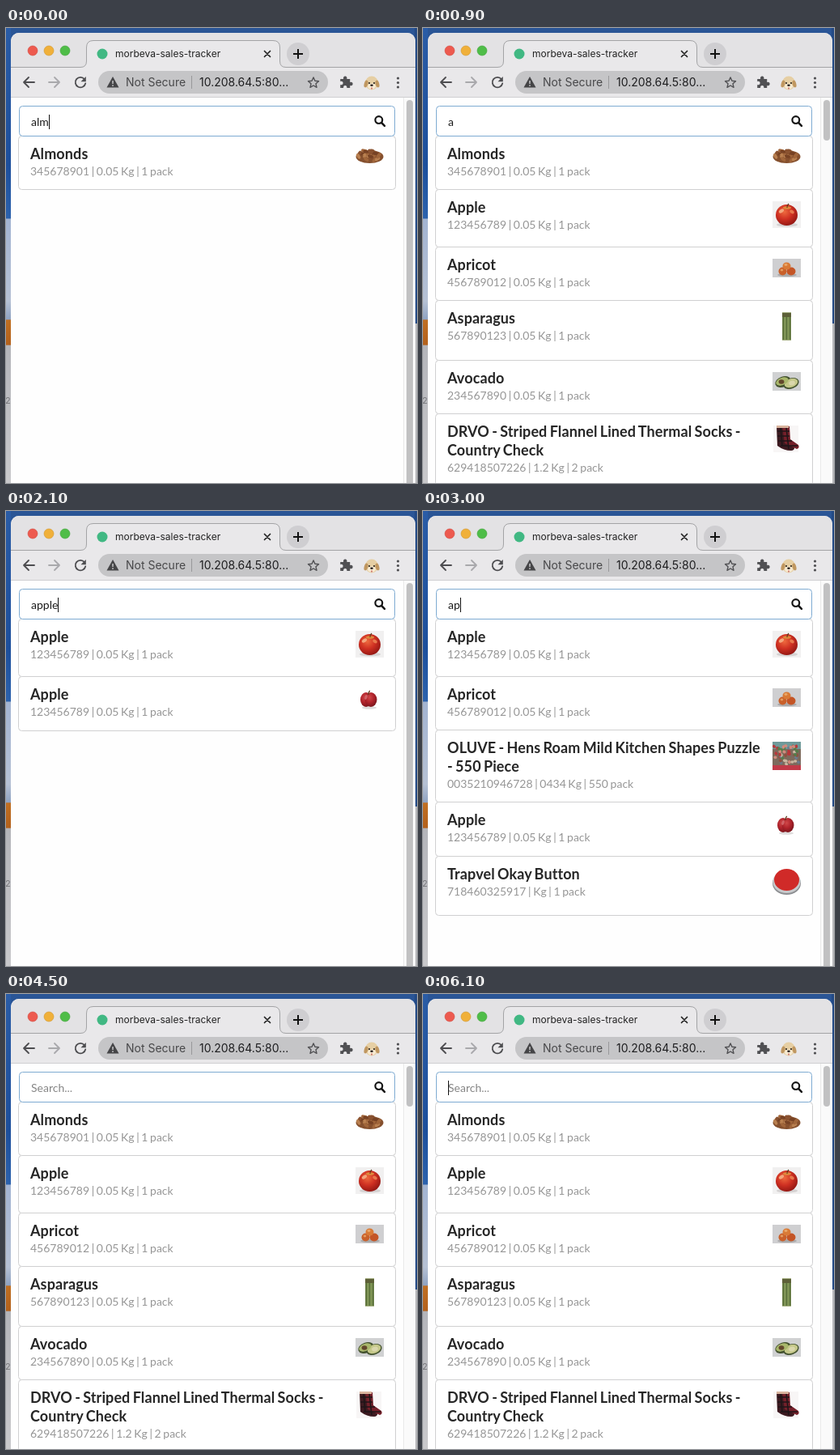
These frames come from a looping animation (508x562 px, 6.2 s). An HTML page:

```html
<!DOCTYPE html>
<html lang="en">
<head>
<meta charset="utf-8">
<title>Product search</title>
<style>
  html, body { margin: 0; width: 100%; height: 100%; overflow: hidden; background: #fff; }
  svg { display: block; }
  text { white-space: pre; }
  .ui { font-family: Inter, Roboto, sans-serif; }
  .lato { font-family: Lato, sans-serif; font-size: 14px; word-spacing: -.07em; }
  .title { font-weight: 700; font-size: 18px; letter-spacing: .006em; fill: #262626; }
  .info { fill: #969696; }
  .line { fill: none; stroke-linecap: round; stroke-linejoin: round; }
</style>
</head>
<body>
<svg width="508" height="562" viewBox="0 0 508 562">
  <defs>
    <linearGradient id="wall" x2="0" y2="1">
      <stop offset="0" stop-color="#2a5ca6"/>
      <stop offset=".3" stop-color="#1d4f9c"/>
      <stop offset=".418" stop-color="#2c62ad"/>
      <stop offset=".42" stop-color="#a3b4d2"/>
      <stop offset=".6" stop-color="#b6c1d4"/>
      <stop offset=".64" stop-color="#8fa3c2"/>
      <stop offset=".642" stop-color="#c06f22"/>
      <stop offset=".696" stop-color="#b3611c"/>
      <stop offset=".698" stop-color="#b4b5ba"/>
      <stop offset="1" stop-color="#c9c9cc"/>
    </linearGradient>
    <radialGradient id="red" cx=".4" cy=".35" r=".7">
      <stop offset="0" stop-color="#ee6a3e"/>
      <stop offset=".5" stop-color="#cf3022"/>
      <stop offset="1" stop-color="#8f1512"/>
    </radialGradient>
    <radialGradient id="darkRed" cx=".4" cy=".35" r=".7">
      <stop offset="0" stop-color="#d0484a"/>
      <stop offset=".5" stop-color="#b0232b"/>
      <stop offset="1" stop-color="#74141b"/>
    </radialGradient>
  </defs>

  <!-- desktop -->
  <rect width="508" height="562" fill="url(#wall)"/>
  <rect x="6" width="502" height="20" fill="#2a5596"/>
  <rect x="505" width="3" height="365" fill="#234a86"/>
  <rect x="505" y="365" width="3" height="197" fill="#b9babd"/>
  <text class="ui" x="-1" y="464" font-size="11" fill="#77787c">2</text>

  <!-- window -->
  <path d="M6 562V16a10 10 0 0 1 10-10H496a10 10 0 0 1 10 10V562Z" fill="#fefefe"/>
  <path d="M6 86V16a10 10 0 0 1 10-10H496a10 10 0 0 1 10 10V86Z" fill="#e3e2e4"/>
  <path d="M6 48.5H92Q99.5 48.5 99.5 41V24Q99.5 15.5 108 15.5H330Q338.5 15.5 338.5 24V41Q338.5 48.5 346 48.5H506V85.5H6Z" fill="#e9e8ea"/>
  <path d="M6 48.5H92Q99.5 48.5 99.5 41V24Q99.5 15.5 108 15.5H330Q338.5 15.5 338.5 24V41Q338.5 48.5 346 48.5H506" fill="none" stroke="#a3a3a5"/>
  <path d="M6 85.5H506" stroke="#cfcfd1"/>
  <g stroke-width=".6">
    <circle cx="33" cy="28" r="6" fill="#ed5a4f" stroke="#d1493f"/>
    <circle cx="53" cy="28" r="6" fill="#f0b03a" stroke="#d1962c"/>
    <circle cx="73" cy="28" r="6" fill="#4fbd48" stroke="#3ea338"/>
  </g>
  <circle cx="119" cy="32" r="6.5" fill="#41b883"/>
  <text class="ui" x="135" y="36.3" font-size="12" fill="#222">morbeva-sales-tracker</text>
  <path class="line" d="M319.5 28.5l7 7m0-7l-7 7" stroke="#222" stroke-width="1.7"/>
  <circle cx="361" cy="32" r="14" fill="#cfced1"/>
  <path d="M355 32h12M361 26v12" stroke="#111" stroke-width="2"/>

  <!-- toolbar -->
  <g class="line" stroke-width="1.8">
    <path d="M35 67H22m6-6l-6 6 6 6" stroke="#4d4d50"/>
    <path d="M53 67h13m-6-6l6 6-6 6" stroke="#a9a9ac"/>
    <path d="M97 63.2A6.3 6.3 0 1 0 98.2 68.5" stroke="#4d4d50"/>
  </g>
  <path d="M98.8 60v6.3h-6.3Z" fill="#4d4d50"/>
  <rect x="114" y="53" width="284" height="28" rx="14" fill="#c5c5c7"/>
  <path d="M132 60l7.5 13.5h-15Z" fill="#454547"/>
  <path d="M132 65v4m0 1.3v1.7" stroke="#c5c5c7" stroke-width="1.5"/>
  <text class="ui" x="148" y="72" font-size="14" fill="#48484a">Not Secure</text>
  <path d="M229.5 59v16" stroke="#98989a"/>
  <text class="ui" x="239" y="72" font-size="14" fill="#1e1e20">10.208.64.5:80...</text>
  <path class="line" d="M380 61l1.900 4.200 4.600.5-3.500 3.100 1 4.500-4-2.300-4 2.300 1-4.500-3.500-3.100 4.600-.5Z" stroke="#505053" stroke-width="1.4"/>
  <path transform="translate(-.8 0)" d="M414 63h4a2.300 2.300 0 1 1 4 0h4v4a2.300 2.300 0 1 1 0 4v3h-4a2.200 2.200 0 1 0-4 0h-4v-4a2.300 2.300 0 1 0 0-4Z" fill="#505053"/>
  <g>
    <ellipse cx="452" cy="68" rx="8" ry="8.500" fill="#e6cfa4"/>
    <ellipse cx="445" cy="69" rx="2.300" ry="4.500" fill="#c09760" transform="rotate(15 445 69)"/>
    <ellipse cx="459" cy="69" rx="2.300" ry="4.500" fill="#c09760" transform="rotate(-15 459 69)"/>
    <ellipse cx="452" cy="72" rx="5" ry="3.600" fill="#f7ead2"/>
    <circle cx="449" cy="68" r="1.100" fill="#2a2320"/>
    <circle cx="455" cy="68" r="1.100" fill="#2a2320"/>
    <ellipse cx="452" cy="70.800" rx="1.800" ry="1.300" fill="#2a2320"/>
    <path d="M451 73.500h2v2h-2Z" fill="#d08078"/>
  </g>
  <g fill="#4d4d50"><circle cx="484.5" cy="62" r="1.600"/><circle cx="484.5" cy="67.500" r="1.600"/><circle cx="484.5" cy="73" r="1.600"/></g>

  <!-- page -->
  <rect x="491" y="86" width="15" height="476" fill="#fafafa"/>
  <path d="M491.5 86V562" stroke="#e9e9e9"/>
  <rect id="thumb" x="495" y="89" width="8" rx="4" fill="#c1c1c2"/>
  <g id="list"></g>
  <rect x="16.5" y="96.5" width="464" height="37" rx="4" fill="#fff" stroke="#7eabd2"/>
  <text id="field" class="lato" x="31" y="121"></text>
  <path id="caret" d="M.5 107V125" stroke="#111"/>
  <circle class="line" cx="460.8" cy="113.600" r="4.400" stroke="#151515" stroke-width="2.200"/>
  <path class="line" d="M464.300 117.200l3.600 3.600" stroke="#151515" stroke-width="2.600"/>
</svg>
<script>
const LOOP = 6200;
const get = id => document.getElementById(id);

function seeded(seed) {
  return () => (seed = (seed * 16807) % 2147483647) / 2147483647;
}
const repeat = (n, fn) => Array.from({ length: n }, (_, i) => fn(i)).join('');
const box = (x, y, w, h, fill) => `<rect x="${x}" y="${y}" width="${w}" height="${h}" fill="${fill}"/>`;
const oval = (x, y, rx, ry, fill, turn = 0) =>
  `<ellipse cx="${x}" cy="${y}" rx="${rx}" ry="${ry}" fill="${fill}" transform="rotate(${turn} ${x} ${y})"/>`;

// Pictures are drawn in a 35px wide space.
function almonds() {
  const rnd = seeded(77), tones = ['#a0653a', '#8a5230', '#b98050', '#774224'];
  return oval(17.5, 11, 17, 8, '#85502e') + repeat(26, i => {
    const a = rnd() * 6.28, r = Math.sqrt(rnd());
    return oval(17.5 + Math.cos(a) * r * 14, 10 + Math.sin(a) * r * 8, 3.6, 2, tones[i % 4], rnd() * 120 - 60);
  });
}
const apple = () => box(0, 0, 35, 33, '#f1f0f0') + oval(18, 29, 13, 2.5, '#d5d2d2') +
  oval(17.5, 17, 13.5, 13, 'url(#red)') + oval(11, 12, 3.5, 2, '#f3a67c', -35) + oval(24, 13, 3, 2, '#e8784c', 30) +
  oval(18, 8, 5, 1.8, '#dc8a3c') + '<path d="M18 8q0-3 2-5" fill="none" stroke="#5c3a1c" stroke-width="1.2"/>';
const smallApple = () => oval(17, 24, 9, 1.8, '#dedcdc') + oval(13, 14, 7, 9, 'url(#darkRed)') +
  oval(19, 14, 7.5, 9, 'url(#darkRed)') + oval(13, 11, 1.6, 3, '#d06468', 20) +
  '<path d="M16 8q0-4 2-5" fill="none" stroke="#5c3a1c" stroke-width="1.2"/>';
const apricots = () => box(0, 0, 35, 23, '#cfcfd1') + oval(18, 20, 12, 2, '#aaa9a9') +
  oval(12.5, 15.5, 5, 5, '#c9602a') + oval(23, 15.5, 5.5, 5, '#c45526') + oval(17.5, 9, 5, 4.5, '#d97a36') +
  oval(11.5, 14, 1.8, 1.4, '#e39a5c') + oval(16.5, 7.5, 2, 1.4, '#eaa868');
const asparagus = () => box(12, 0, 11, 35, '#a3ad80') + repeat(5, i =>
  `<path d="M${13.3 + i * 2.1} ${1 + i % 2}V34" stroke="${i % 2 ? '#76904a' : '#50692f'}" stroke-width="1.7"/>`) +
  box(12, 1, 11, 5, '#5d6038');
const avocado = () => box(0, 0, 35, 23, '#d0d1d2') + oval(13, 12, 10, 6.5, '#43522f', -20) +
  oval(23, 14, 10, 6.5, '#43522f', -20) + oval(23, 13.5, 8.5, 5.2, '#c5c88a', -20) + oval(12, 11.5, 8, 4.6, '#a9b76c', -20) +
  oval(24, 13.5, 4, 2.8, '#dad7ac', -20) + oval(11, 12, 3.4, 2.8, '#63472c');
const socks = () => box(1, 0, 31, 33, '#f8f6f6') +
  '<path d="M5 1H15L16 18 26 25Q29 30 23 31 14 31 6 25Z" fill="#3d1a20"/>' +
  '<path d="M12 1H21L22 17 32 24Q34 28 30 29L15 22Z" fill="#74202a"/>' +
  '<path d="M6 7H21M6 13H21M7 19H24M10 25H31M10 2L12 25M17 2L20 29" stroke="#1f1518" stroke-width="1.6"/>' +
  box(5, 0, 15, 3, '#d9b49e');
function puzzle() {
  const rnd = seeded(31), tones = ['#b8383b', '#547d4a', '#d28a7c', '#6b7b8d', '#8f5140', '#c9b6a0'];
  return box(0, 0, 35, 35, '#7d6a5c') + box(0, 0, 35, 9, '#6f9a9a') +
    repeat(45, i => oval(2 + rnd() * 31, 4 + rnd() * 24, 2.2, 1.8, tones[i % 6], rnd() * 90)) +
    box(0, 29, 35, 6, '#c23a48');
}
const button = () => oval(17.5, 19, 17.5, 14, '#8d8f92') + oval(17.5, 17, 17, 14, '#c8cacc') +
  oval(17.5, 14.5, 15.5, 13.5, '#d02a28');

// title lines, info, row height, picture
const items = [
  [['Almonds'], '345678901 | 0.05 Kg | 1 pack', 66, almonds],
  [['Apple'], '123456789 | 0.05 Kg | 1 pack', 71, apple],
  [['Apricot'], '456789012 | 0.05 Kg | 1 pack', 66, apricots],
  [['Asparagus'], '567890123 | 0.05 Kg | 1 pack', 74, asparagus],
  [['Avocado'], '234567890 | 0.05 Kg | 1 pack', 66, avocado],
  [['DRVO - Striped Flannel Lined Thermal Socks -', 'Country Check'], '629418507226 | 1.2 Kg | 2 pack', 89, socks],
  [['OLUVE - Hens Roam Mild Kitchen Shapes Puzzle', '- 550 Piece'], '0035210946728 | 0434 Kg | 550 pack', 89, puzzle],
  [['Apple'], '123456789 | 0.05 Kg | 1 pack', 67, smallApple],
  [['Trapvel Okay Button'], '718460325917 | Kg | 1 pack', 73, button],
];

// time in ms, typed text
const edits = [
  [0, 'alm'], [200, 'al'], [400, 'a'], [1400, 'ap'], [1600, 'app'], [1800, 'appl'], [2000, 'apple'],
  [2600, 'appl'], [2800, 'app'], [2900, 'ap'], [3100, 'a'], [3300, ''],
];

function row([lines, info, height, picture], top) {
  const titles = lines.map((s, i) => `<text class="lato title" x="30" y="${top + 28 + i * 23}">${s}</text>`).join('');
  return `<rect x="15.5" y="${top - 0.5}" width="466" height="${height}" rx="4" fill="#fff" stroke="#d0d0d1"/>` +
    titles + `<text class="lato info" x="30" y="${top + 25 + lines.length * 23}">${info}</text>` +
    `<g transform="translate(432 ${top + 14})">${picture()}</g>`;
}

let shown = null;
function show(query) {
  if (query === shown) return;
  shown = query;
  let top = 134;
  get('list').innerHTML = items
    .filter(([lines]) => lines.join(' ').toLowerCase().includes(query))
    .map(item => {
      const html = row(item, top);
      top += item[2];
      return html;
    }).join('');
  get('thumb').setAttribute('height', top > 562 ? 50 : 480);
  const field = get('field');
  field.textContent = query || 'Search...';
  field.setAttribute('fill', query ? '#1c1c1c' : '#858585');
  const x = 31 + (query ? Math.round(field.getComputedTextLength()) : 0);
  get('caret').setAttribute('transform', `translate(${x} 0)`);
}

function tick() {
  const t = performance.now() % LOOP;
  const [since, query] = edits.findLast(([at]) => at <= t);
  show(query);
  const lit = t - since < 300 || t % 1000 < 500;
  get('caret').style.visibility = lit ? 'visible' : 'hidden';
  requestAnimationFrame(tick);
}
tick();
</script>
</body>
</html>
```
